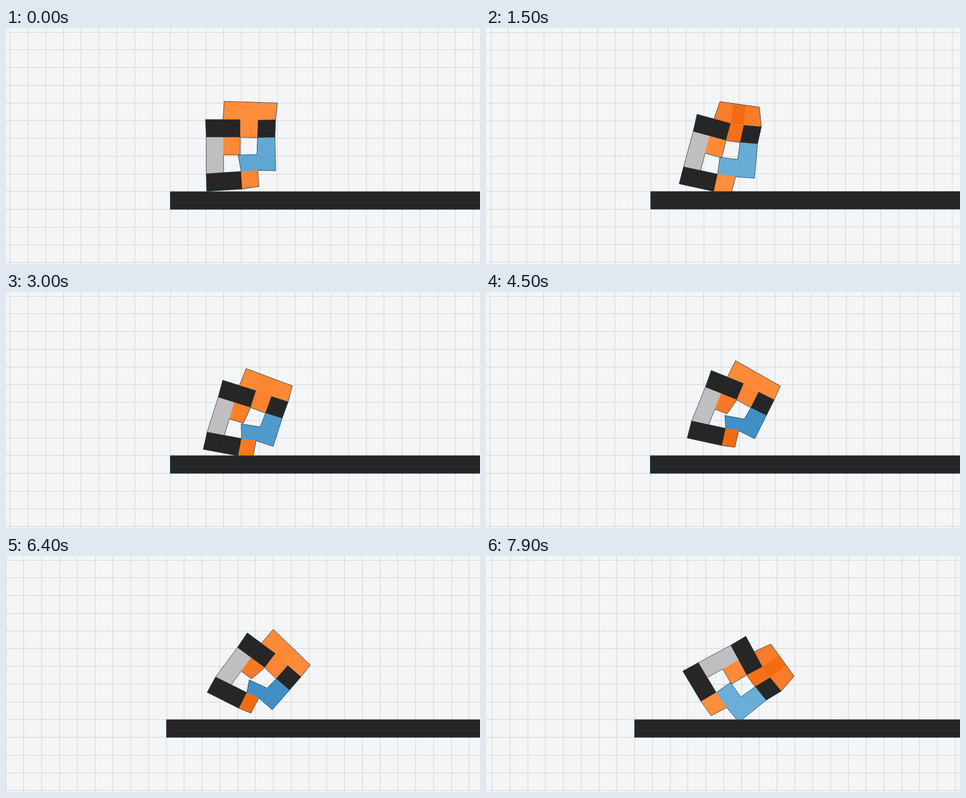
An HTML page with a canvas for the animation above (8 s loop, 1058 by 529 pixels).

```html
<!DOCTYPE html>
<html lang="en">
<head>
<meta charset="utf-8">
<title>Soft robot</title>
<style>
html, body { margin: 0; width: 100%; height: 100%; overflow: hidden; background: #f4f5f7; }
canvas { display: block; width: 100%; height: 100%; }
</style>
</head>
<body>
<canvas id="stage" width="1058" height="529"></canvas>
<script>
const W = 1058, H = 529, LOOP = 8000, STEP = 100;
const ctx = document.getElementById('stage').getContext('2d');

// B rigid, G soft, O horizontal actuator, V vertical actuator
const BODY = ['-OOO', 'BBOB', 'GO-V', 'G-VV', 'BBO-'];

// Motion of the rig: inner corner of the foot (x, y), turn of the spine in degrees,
// and how far the head and leg muscles are stretched (0 to 1)
const keys = [
  { time: 0,    x: 447, y: 326.5, turn: 0,    head: 1,   legs: .8 },
  { time: 1500, x: 441, y: 311,   turn: 15.2, head: .1,  legs: .9 },
  { time: 3000, x: 449, y: 314,   turn: 17.5, head: .75, legs: .4 },
  { time: 4500, x: 459, y: 289,   turn: 22,   head: .9,  legs: .05 },
  { time: 6400, x: 468, y: 271,   turn: 36.4, head: .9,  legs: .05 },
  { time: 7300, x: 463, y: 262,   turn: 51.3, head: .1,  legs: .6 },
  { time: 7900, x: 474, y: 239,   turn: 61.7, head: .1,  legs: .95 }
];

const lerp = (a, b, k) => a + (b - a) * k;
const mix = (a, b, k) => a.map((v, i) => lerp(v, b[i], k));
const clamp01 = v => Math.min(1, Math.max(0, v));
const smooth = v => (v = clamp01(v), v * v * (3 - 2 * v));
const stretch = k => 28.5 + 11 * k;

function rigAt(time) {
  const next = Math.max(1, keys.findIndex(key => key.time >= time));
  const a = keys[next - 1], b = keys[next];
  const k = (time - a.time) / (b.time - a.time);
  return Object.fromEntries(Object.keys(a).map(name => [name, lerp(a[name], b[name], k)]));
}

// Moves along and up inside a frame turned by the given degrees
function shift([x, y], degrees, along, up) {
  const r = degrees * Math.PI / 180, c = Math.cos(r), s = Math.sin(r);
  return [x + along * c + up * s, y + along * s - up * c];
}

// Nodes are named by column and row; "b" is the corner where two cells meet unjoined.
function buildNodes({ x, y, turn, head, legs }) {
  const slack = 1 - legs;
  const top = turn + 9 * (head - legs);
  const right = top - 3;
  const foot = turn - 2 - 8 * slack;
  const legSize = stretch(legs), headSize = stretch(head);
  const n = { '04': [x, y] };
  const middle = (name, a, b) => n[name] = mix(n[a], n[b], .5);

  // foot bar
  n['24'] = shift(n['04'], foot, 78, 0);
  n['05'] = shift(n['04'], foot + 2, 0, -39.5);
  n['25'] = shift(n['05'], foot, 79.5, 0);
  n['35'] = shift(n['25'], foot - 5, legSize, 0);
  middle('14', '04', '24');
  middle('15', '05', '25');

  // spine and shoulder bar
  n['02'] = shift(n['04'], turn, 0, 81.5);
  n['01'] = shift(n['02'], turn - 2.5, 0, 39.8);
  n['21'] = shift(n['01'], turn, 78, 0);
  n['22'] = shift(n['02'], turn, 76, 0);
  middle('03', '02', '04');
  middle('11', '01', '21');
  middle('12', '02', '22');
  middle('13', '12', '14');
  n['23'] = shift(n['13'], turn, legSize, 0);

  // head
  n['10'] = shift(n['11'], turn + 4, 0, 41);
  for (const c of [2, 3, 4]) n[c + '0'] = shift(n['10'], top, headSize * (c - 1), 0);
  n['31'] = shift(n['21'], top, headSize, 0);
  n['32'] = shift(n['22'], top, stretch(.7 * head + .25 * legs), 0);
  n['41'] = shift(n['31'], right, 39, 0);
  n['42'] = shift(n['32'], right, 39, 0);

  // rear leg, meeting the foot halfway
  n['33'] = shift(n['32'], top, 0, -legSize);
  n['44'] = shift(n['42'], right, 0, -2 * legSize);
  n['34'] = mix(shift(n['44'], right, -40, 0), shift(n['24'], foot - 3, legSize, 0), .5);
  n.b = shift(n['24'], foot - 4 - 13 * slack, 0, legSize);
  middle('43', '42', '44');
  return n;
}

// Cells with corners clockwise from top left
const cells = BODY.flatMap((row, r) => [...row].map((kind, c) => ({
  kind,
  corners: [kind === 'V' && c === 2 ? 'b' : `${c}${r}`, `${c + 1}${r}`, `${c + 1}${r + 1}`, `${c}${r + 1}`]
}))).filter(cell => cell.kind !== '-');

// Outline: edges that belong to a single cell
const edgeCount = new Map();
for (const { corners } of cells) {
  corners.forEach((a, i) => {
    const edge = [a, corners[(i + 1) % 4]].sort().join();
    edgeCount.set(edge, (edgeCount.get(edge) || 0) + 1);
  });
}
const outline = [...edgeCount].filter(([, count]) => count === 1).map(([edge]) => edge.split(','));

const ACTUATOR = {
  O: [[242, 104, 16], [255, 142, 61]],
  V: [[62, 142, 196], [108, 175, 215]]
};

function colorOf(kind, [a, b, c, d]) {
  if (kind === 'B') return '#262626';
  if (kind === 'G') return '#bfbfbf';
  const dist = (p, q) => Math.hypot(p[0] - q[0], p[1] - q[1]);
  const size = kind === 'O' ? dist(a, b) + dist(d, c) : dist(a, d) + dist(b, c);
  const rgb = mix(...ACTUATOR[kind], clamp01((size / 2 - 28.5) / 11));
  return `rgb(${rgb.map(Math.round)})`;
}

// The camera zooms out a touch early on and pans right at the end.
function cameraAt(time) {
  const zoom = 1 - .0045 * Math.exp(-(((time - 1500) / 700) ** 2));
  const pan = 36 * smooth((time - 5580) / 2570);
  return {
    left: W / 2 + (366.7 - pan - W / 2) * zoom,
    top: H / 2 + (366.9 - H / 2) * zoom,
    spacing: 39.76 * zoom
  };
}

function drawGrid({ left, top, spacing }) {
  ctx.fillStyle = '#f4f5f7';
  ctx.fillRect(0, 0, W, H);
  ctx.fillStyle = '#c8cbcd';
  for (let x = left % spacing; x < W; x += spacing) ctx.fillRect(Math.floor(x), 0, 1, H);
  for (let y = top % spacing; y < H; y += spacing) ctx.fillRect(0, Math.floor(y), W, 1);
}

function drawGround({ left, top, spacing }) {
  const rect = [left, top, W, spacing];
  ctx.fillStyle = '#262626';
  ctx.fillRect(...rect);
  ctx.strokeStyle = '#1b4258';
  ctx.lineWidth = 1;
  ctx.strokeRect(...rect);
}

function drawRobot(nodes) {
  ctx.lineJoin = 'round';
  ctx.lineWidth = .6;
  for (const { kind, corners } of cells) {
    const quad = corners.map(name => nodes[name]);
    ctx.fillStyle = ctx.strokeStyle = colorOf(kind, quad);
    ctx.beginPath();
    quad.forEach(p => ctx.lineTo(...p));
    ctx.closePath();
    ctx.fill();
    ctx.stroke();
  }
  ctx.beginPath();
  for (const [a, b] of outline) {
    ctx.moveTo(...nodes[a]);
    ctx.lineTo(...nodes[b]);
  }
  ctx.strokeStyle = '#1b4258';
  ctx.lineWidth = 1;
  ctx.stroke();
}

function frame() {
  const time = Math.floor(performance.now() % LOOP / STEP) * STEP;
  const camera = cameraAt(time);
  drawGrid(camera);
  drawRobot(buildNodes(rigAt(time)));
  drawGround(camera);
  requestAnimationFrame(frame);
}
frame();
</script>
</body>
</html>
```
